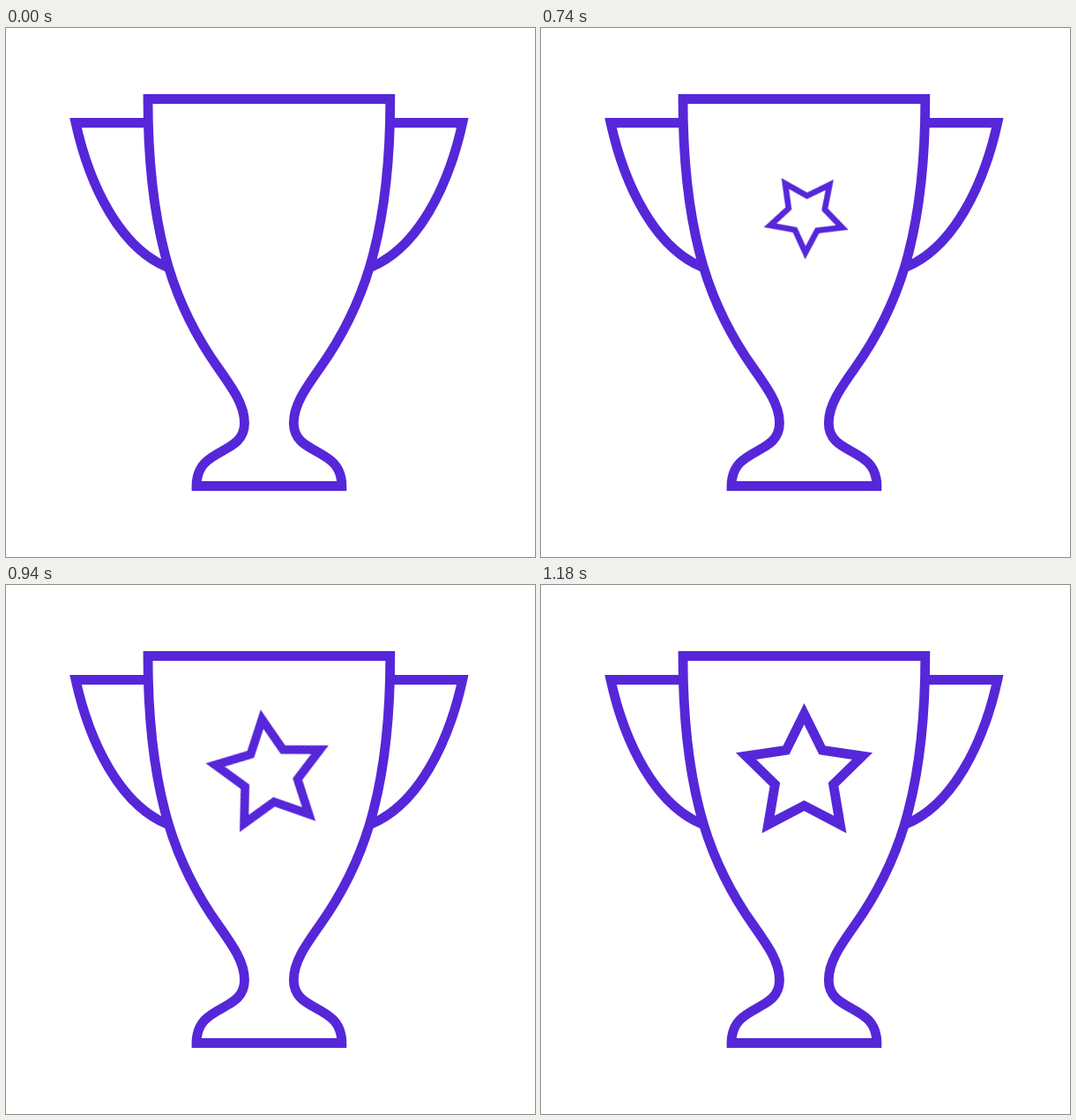
These frames come from a looping animation (600x600 px, 2.14 s). An HTML page:

```html
<!DOCTYPE html>
<html lang="en">
<head>
<meta charset="utf-8">
<title>Trophy</title>
<style>
  html, body { margin: 0; width: 100%; height: 100%; overflow: hidden; background: #fff; }
  svg { display: block; width: 100vw; height: 100vh; }
  .line { fill: none; stroke: #5527d9; stroke-width: 10.8; stroke-miterlimit: 10; }
  #star { transform-origin: 298.5px 208px; transform: scale(0); }
</style>
</head>
<body>
<svg viewBox="0 0 600 600">
  <g class="line">
    <path d="M161 80.5 C161 245 197 324 241 386 C258 410 270.5 428 270.5 448
             C270.5 486 216 474 216 519.5 H380.9
             C380.9 474 326.3 486 326.3 448 C326.3 428 338.8 410 355.8 386
             C399.8 324 435.8 245 435.8 80.5 Z"/>
    <path id="handle" d="M161 107.5 H79 C95 180 130 250 183.5 271.5"/>
    <use href="#handle" transform="translate(596.8 0) scale(-1 1)"/>
    <polygon id="star"/>
  </g>
</svg>
<script>
  const LOOP = 2140, STEP = 20;
  const START = 482, LENGTH = 720;
  const FIRST = 500, LAST = 1180;

  const star = document.getElementById('star');
  const center = { x: 298.5, y: 215.5 };
  star.setAttribute('points', Array.from({ length: 10 }, (_, i) => {
    const r = i % 2 ? 34.8 : 69.4;
    const a = i * Math.PI / 5;
    return [center.x + r * Math.sin(a), center.y - r * Math.cos(a)].map(v => v.toFixed(2));
  }).join(' '));

  // cubic-bezier(.25, .1, .25, 1), solved by bisection
  function ease(x) {
    let lo = 0, hi = 1;
    for (let i = 0; i < 30; i++) {
      const u = (lo + hi) / 2;
      if (0.75 * u * (1 - u) + u ** 3 < x) lo = u; else hi = u;
    }
    return 0.3 * lo * (1 - lo) ** 2 + 3 * lo * lo * (1 - lo) + lo ** 3;
  }

  const pose = (time, p) => ({
    offset: time / LOOP,
    transform: `rotate(${-90 * (1 - p)}deg) scale(${p})`,
    easing: 'step-end'
  });

  const frames = [pose(0, 0)];
  for (let t = FIRST; t < LAST; t += STEP) frames.push(pose(t, ease((t - START) / LENGTH)));
  frames.push(pose(LAST, 1), pose(LOOP, 1));

  star.animate(frames, { duration: LOOP, iterations: Infinity });
</script>
</body>
</html>
```
